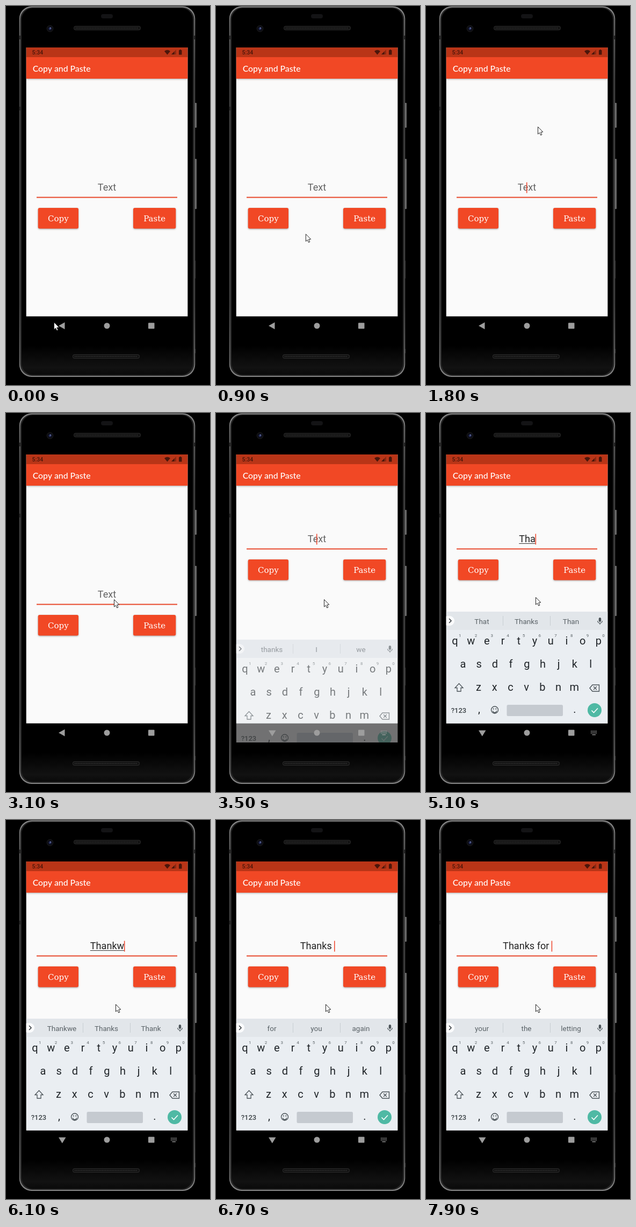
Animation, 380 px wide and 704 px high, one loop 8 s. Source, as an HTML page with a canvas:

```html
<!DOCTYPE html>
<html lang="en">
<head>
<meta charset="utf-8">
<title>Copy and Paste</title>
<style>
html, body { margin: 0; width: 380px; height: 704px; overflow: hidden; background: #000; }
canvas { display: block; }
</style>
</head>
<body>
<canvas id="stage" width="380" height="704"></canvas>
<script>
const ctx = document.getElementById('stage').getContext('2d');
const LOOP = 8000, STEP = 100;
const RED = '#f14825', INK = '#1f2428', KEY_ICON = '#4b5358';
const LEFT = 37.7, WIDTH = 300.7;

// time, x, y of the pointer tip
const POINTER = [
  [300, 89, 587], [700, 132, 500], [1200, 219, 308], [1500, 213, 185], [1700, 208, 224],
  [1900, 208, 224], [2100, 178, 380], [2400, 114, 404], [2700, 160, 375], [3000, 201, 346],
  [3800, 201, 346], [4100, 204, 342]
];
// time, field text, suggestions
const TYPING = [
  [0, '', 'thanks|I|we'],
  [4900, 'T', 'T|The|This'],
  [5000, 'Th', 'The|This|That'],
  [5100, 'Tha', 'That|Thanks|Than'],
  [5200, 'Than', 'Than|Thanks|Thankful'],
  [5400, 'Thank', 'Thank|Thanks|Thankful'],
  [5700, 'Thankwe', 'Thankwe|Thanks|Thank'],
  [6100, 'Thankw', 'Thankwe|Thanks|Thank'],
  [6200, 'Thankw', 'Thankw|Thanks|Thank'],
  [6400, 'Thank', 'Thank|Thanks|Thank'],
  [6500, 'Thank', 'Thank|Thanks|Thankfully'],
  [6600, 'Thanks', 'Thanks|Thank|Thankfully'],
  [6700, 'Thanks ', 'for|you|again'],
  [7600, 'Thanks f', 'from|for|f'],
  [7700, 'Thanks fo', 'for|follow|of'],
  [7800, 'Thanks for', 'for|form|forth'],
  [7900, 'Thanks for ', 'your|the|letting']
];

function box(x, y, w, h, fill, r = 0) {
  ctx.fillStyle = fill;
  ctx.beginPath();
  ctx.roundRect(x, y, w, h, r);
  ctx.fill();
}
function disc(x, y, r, fill) {
  ctx.fillStyle = fill;
  ctx.beginPath();
  ctx.arc(x, y, r, 0, 7);
  ctx.fill();
}
function text(str, x, y, font, fill, align = 'center') {
  ctx.font = font;
  ctx.fillStyle = fill;
  ctx.textAlign = align;
  ctx.fillText(str, x, y);
}
function poly(points, fill, stroke, width = 1, close = true) {
  ctx.beginPath();
  points.forEach(([x, y]) => ctx.lineTo(x, y));
  if (close) ctx.closePath();
  if (fill) { ctx.fillStyle = fill; ctx.fill(); }
  if (stroke) { ctx.strokeStyle = stroke; ctx.lineWidth = width; ctx.stroke(); }
}
// stops are [offset, color] pairs
function gradient(x0, y0, x1, y1, stops) {
  const g = ctx.createLinearGradient(x0, y0, x1, y1);
  stops.forEach(([at, color]) => g.addColorStop(at, color));
  return g;
}
function shadowed(draw, blur, dy, alpha) {
  ctx.save();
  ctx.shadowColor = `rgba(0,0,0,${alpha})`;
  ctx.shadowBlur = blur;
  ctx.shadowOffsetY = dy;
  draw();
  ctx.restore();
}

function speaker(x, y) {
  box(x, y, 125, 8, '#2b2b2b', 4);
  box(x + 1, y + 1, 123, 6, '#131313', 3);
  for (let i = 4; i < 121; i += 3) box(x + i, y + 3, 1.5, 2, '#303030');
}

function phone() {
  box(0, 0, 380, 704, '#000');
  const metal = gradient(350, 0, 355.5, 0, [[0, '#1c1c1c'], [0.6, '#808080'], [1, '#333']]);
  [[180, 46], [284, 93]].forEach(([y, h]) => box(350, y, 5.5, h, metal, 1));
  box(351, 473, 2, 33, '#333');
  box(351, 637, 2, 8, '#333');
  const rim = gradient(0, 0, 0, 689, [[0, '#8a8a8a'], [0.08, '#6a6a6a'], [0.2, '#484848'],
    [0.8, '#484848'], [0.94, '#6a6a6a'], [1, '#858585']]);
  box(24.7, 0.5, 327.6, 688.5, rim, 23);
  box(26.5, 2.5, 324, 684.5, '#262626', 22);
  box(29, 4, 319, 681, gradient(0, 4, 0, 685,
    [[0, '#000'], [0.92, '#000'], [0.98, '#121212'], [1, '#0a0a0a']]), 21);
  [55, 187].forEach(y => box(25, y, 3, 7, '#252525'));
  box(349, 55, 3, 7, '#252525');
  box(177, 15, 22, 8, '#131315', 4);
  disc(82, 42, 6.5, '#141416');
  disc(82, 42, 4.5, '#090a14');
  disc(82, 42, 2.5, '#28305c');
  disc(83, 41, 1.2, '#6570a0');
  speaker(126, 37);
  speaker(124, 647);
}

function statusBar() {
  const dark = '#4b160b';
  box(LEFT, 77, WIDTH, 18, '#b93517');
  text('5:34', 48.5, 90, '500 10.5px Roboto, sans-serif', dark, 'left');
  ctx.fillStyle = dark;
  ctx.beginPath();
  ctx.moveTo(300.5, 90.5);
  ctx.lineTo(295, 84);
  ctx.quadraticCurveTo(300.5, 79.5, 306, 84);
  ctx.fill();
  poly([[308, 90], [317, 90], [317, 81]], '#8d2913');
  poly([[308, 90], [313.5, 90], [313.5, 84.5]], dark);
  box(322, 82, 5.5, 8.5, dark, 0.6);
  box(323.5, 81, 2.5, 2, dark);
}

function button(label, x, y, w) {
  shadowed(() => box(x, y, w, 38.5, RED, 3), 3, 1, 0.35);
  text(label, x + w / 2, y + 25.3, '15px "DejaVu Serif", serif', '#fff');
}

function field(value, dy, caretOn) {
  const font = '18.1px Roboto, sans-serif', base = 343 - dy;
  let caretX = 187.7;
  if (value) {
    ctx.font = font;
    const width = ctx.measureText(value).width, left = 188.5 - width / 2;
    text(value, left, base, font, '#222', 'left');
    const word = value.slice(value.lastIndexOf(' ') + 1);
    const wordWidth = ctx.measureText(word).width;
    if (word) box(left + width - wordWidth, base + 2, wordWidth, 1, '#333');
    caretX = left + width + 0.5;
  } else {
    text('Text', 188, base, font, '#646464');
  }
  if (caretOn) box(caretX - 0.8, base - 15.5, 1.6, 20, '#ee4b33');
  box(57, 354.6 - dy, 262, 1.8, '#e8492c');
}

function app(value, dy, caretOn) {
  box(LEFT, 77, WIDTH, 499.6, '#fafafa');
  shadowed(() => box(LEFT, 95, WIDTH, 40, RED), 3, 1, 0.35);
  statusBar();
  text('Copy and Paste', 49.7, 121.5, '500 15.8px Lato, sans-serif', '#fff', 'left');
  field(value, dy, caretOn);
  button('Copy', 59.7, 375 - dy, 75.3);
  button('Paste', 237, 375 - dy, 79.3);
}

function suggestionBar(words) {
  box(LEFT, 369, WIDTH, 34, '#e2e6ea');
  box(32, 377, 21, 18, '#fbfcfd', 9);
  poly([[43, 382], [47, 386], [43, 390]], null, '#30363a', 1.5, false);
  words.split('|').forEach((word, i) =>
    text(word, 104 + i * 83, 391.5, '13.5px Roboto, sans-serif', '#596166'));
  [143, 231].forEach(x => box(x, 377, 1, 18, '#c8ced2'));
  box(321.8, 380, 4.4, 8, KEY_ICON, 2.2);
  ctx.strokeStyle = KEY_ICON;
  ctx.lineWidth = 1.2;
  ctx.beginPath();
  ctx.arc(324, 386, 4.3, 0, Math.PI);
  ctx.moveTo(324, 390.3);
  ctx.lineTo(324, 393);
  ctx.stroke();
}

function keyRow(letters, x, y) {
  [...letters].forEach((c, i) => text(c, x + i * 29.7, y, '20px Roboto, sans-serif', INK));
}

function keyboard(words, upper) {
  box(LEFT, 369, WIDTH, 208, '#eaeef2');
  suggestionBar(words);
  const rows = [['qwertyuiop', 54, 430], ['asdfghjkl', 69, 473], ['zxcvbnm', 98, 516]];
  rows.forEach(([letters, x, y]) => keyRow(upper ? letters.toUpperCase() : letters, x, y));
  [...'1234567890'].forEach((d, i) =>
    text(d, 63.3 + i * 29.7, 416, '8px Roboto, sans-serif', '#5c6468'));

  poly([[61.5, 502.5], [69, 510.5], [65, 510.5], [65, 517], [58, 517], [58, 510.5], [54, 510.5]],
    upper ? KEY_ICON : null, KEY_ICON, 1.3);
  poly([[305, 511], [310, 505], [322.5, 505], [322.5, 517], [310, 517]], null, KEY_ICON, 1.4);
  poly([[312, 508], [318, 514]], null, KEY_ICON, 1.4);
  poly([[318, 508], [312, 514]], null, KEY_ICON, 1.4);

  text('?123', 61, 557, '500 13px Roboto, sans-serif', '#3c4347');
  text(',', 99, 557, '20px Roboto, sans-serif', INK);
  text('.', 277, 557, '20px Roboto, sans-serif', INK);
  ctx.strokeStyle = KEY_ICON;
  ctx.lineWidth = 1.4;
  ctx.beginPath();
  ctx.arc(128, 551.5, 6.5, 0, 7);
  ctx.moveTo(131.5, 553);
  ctx.arc(128, 553, 3.5, 0, Math.PI);
  ctx.stroke();
  disc(125.7, 549.7, 1.1, KEY_ICON);
  disc(130.3, 549.7, 1.1, KEY_ICON);
  box(150.5, 542, 104.5, 21, '#c5cad0', 2.5);
  disc(314, 552, 13, '#4fb9a4');
  poly([[308.5, 552.5], [312.5, 556.5], [320, 548.5]], null, '#fff', 1.6, false);
}

function navBar(open) {
  const gray = '#9d9d9d';
  poly(open ? [[98, 589.5], [111.5, 589.5], [104.7, 600.5]] : [[98, 594], [109.5, 587.5], [109.5, 600.5]], gray);
  disc(188, 594, 5.5, gray);
  box(265, 588.5, 11.5, 11, gray, 1);
  if (!open) return;
  for (let row = 0; row < 3; row++)
    for (let col = 0; col < 5; col++) box(307 + col * 2.4, 590 + row * 2.2, 1.4, 1.3, gray);
  box(309.5, 597, 6.5, 1.3, gray);
}

function pointer(t) {
  let i = POINTER.findIndex(p => p[0] > t);
  if (i < 0) i = POINTER.length;
  const a = POINTER[Math.max(0, i - 1)], b = POINTER[Math.min(i, POINTER.length - 1)];
  const k = a === b ? 0 : (t - a[0]) / (b[0] - a[0]);
  const x = a[1] + (b[1] - a[1]) * k, y = a[2] + (b[2] - a[2]) * k;
  const outline = [[0, 0], [0, 13.5], [3, 10.8], [5.2, 15.5], [7.4, 14.5], [5.3, 9.8], [9.3, 9.5]];
  poly(outline.map(([px, py]) => [x + 0.5 + px, y + 0.5 + py]), '#fff', '#222', 1);
}

function render(t) {
  const open = t >= 3500;
  const [typedAt, value, words] = TYPING.findLast(s => s[0] <= t);
  const blinkStart = value ? typedAt : 400;
  const caretOn = Math.floor((t - blinkStart) / 500) % 2 === 0 && t >= blinkStart;

  phone();
  app(value, open ? 103 : 0, caretOn);
  if (open) {
    const left = t < 3600 ? 1 : t < 3700 ? 0.25 : 0;
    ctx.save();
    ctx.beginPath();
    ctx.rect(LEFT, 135, WIDTH, left ? 477 : 441.6);
    ctx.clip();
    if (left) box(LEFT, 577, WIDTH, 35, '#fafafa');
    ctx.translate(0, 52 * left);
    ctx.globalAlpha = 1 - 0.42 * left;
    keyboard(words, t >= 4800 && t < 4900);
    ctx.restore();
    if (left) box(LEFT, 577, WIDTH, 35, `rgba(0,0,0,${1 - 0.47 * left})`);
  }
  navBar(open);
  pointer(t);
}

function tick(now) {
  render(Math.floor(now % LOOP / STEP) * STEP);
  requestAnimationFrame(tick);
}
render(0);
requestAnimationFrame(tick);
</script>
</body>
</html>
```
